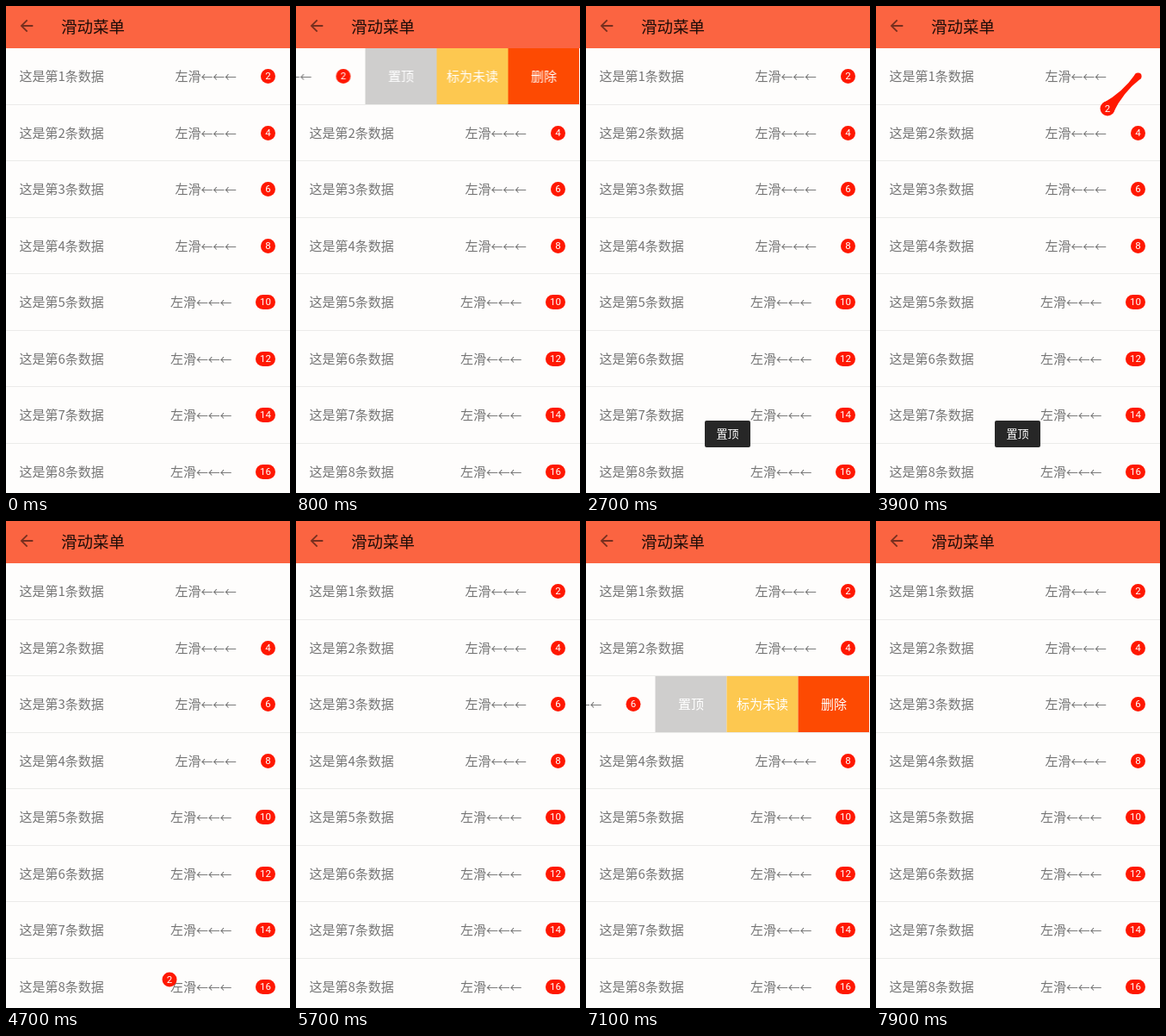
These frames come from a looping animation (330x565 px, 8000 ms). An HTML page:

```html
<!DOCTYPE html>
<html lang="zh-CN">
<head>
<meta charset="utf-8">
<title>滑动菜单</title>
<style>
  :root { --red: #ff1800; --line: #ebebe9; }
  html, body { margin: 0; width: 100%; height: 100%; overflow: hidden; }
  body {
    position: relative;
    background: #fefdfc;
    color: #757575;
    font: 15px/20px "Noto Sans CJK SC", "Noto Sans CJK", "Noto Sans CJK JP", sans-serif;
    white-space: nowrap;
  }
  #stage { position: absolute; left: 0; top: 0; width: 330px; height: 565px; overflow: hidden; }

  header { position: absolute; inset: 0 0 auto; height: 49px; background: #fb6441; }
  header svg { position: absolute; left: 12.5px; top: 12px; fill: #762f1f; }
  header b { position: absolute; left: 64px; top: 11px; font: 400 18.5px/24px inherit; font-size: 18.5px; font-weight: 400; line-height: 24px; color: #1d0c08; }

  .row {
    position: absolute; left: 0; width: 330px; height: 65.5px;
    box-sizing: border-box; border-bottom: 1px solid var(--line); overflow: hidden;
  }
  .slide { position: absolute; inset: 0; }
  .slide > * { position: absolute; top: 0; bottom: 0; display: flex; align-items: center; }
  .name { left: 15.5px; }
  .hint { left: 196.5px; }
  .wide .hint { left: 191px; }
  .hint i { font-style: normal; font-size: 13.8px; }
  .slide > .badge {
    top: 24px; bottom: auto; right: 17px; width: 17px; height: 17px;
    justify-content: center; border-radius: 9px; background: var(--red);
    color: #fff; font: 11.5px/17px Roboto, sans-serif;
  }
  .wide .slide > .badge { width: 23px; }
  .menu { left: 330px; width: 249px; color: #fff; }
  .menu span { flex: 1; height: 100%; display: flex; align-items: center; justify-content: center; }
  .menu span:nth-child(1) { background: #cfcecd; }
  .menu span:nth-child(2) { background: #fdc850; }
  .menu span:nth-child(3) { background: #fd4a02; }

  #goo { position: absolute; inset: 0; fill: var(--red); }
  #goo text { fill: #fff; font: 11.5px Roboto, sans-serif; text-anchor: middle; }

  #toast {
    position: absolute; left: 138px; top: 481px; width: 53px; height: 31px;
    border-radius: 2px; background: #272727; color: #fff;
    font-size: 13px; line-height: 30px; text-align: center;
    animation: toast 8s step-end infinite;
  }
  #row0 .slide { animation: swipeFirst 8s step-end infinite; }
  #row2 .slide { animation: swipeThird 8s step-end infinite; }

  @keyframes swipeFirst {
    0%, 30%, 100% { transform: none; }
    6.25% { transform: translateX(-40px); }
    7.5% { transform: translateX(-145px); }
    8.75% { transform: translateX(-230px); }
    10% { transform: translateX(-249.5px); }
    28.75% { transform: translateX(-31px); }
  }
  @keyframes swipeThird {
    0%, 98.75%, 100% { transform: none; }
    85% { transform: translateX(-40px); }
    86.25% { transform: translateX(-145px); }
    87.5% { transform: translateX(-230px); }
    88.75% { transform: translateX(-249.5px); }
    93.75% { transform: translateX(-225px); }
    95% { transform: translateX(-140px); }
    96.25% { transform: translateX(-55px); }
    97.5% { transform: translateX(-10px); }
  }
  @keyframes toast {
    0%, 58.75%, 100% { opacity: 0; }
    30% { opacity: .3; }
    31.25% { opacity: .6; }
    32.5% { opacity: .85; }
    33.75% { opacity: 1; }
    55% { opacity: .75; }
    56.25% { opacity: .45; }
    57.5% { opacity: .15; }
  }
</style>
</head>
<body>
<div id="stage">
  <header>
    <svg width="22" height="22" viewBox="0 0 24 24"><path d="M20 11H7.83l5.59-5.59L12 4l-8 8 8 8 1.41-1.41L7.83 13H20z"/></svg>
    <b>滑动菜单</b>
  </header>
  <main id="list"></main>
  <svg id="goo" width="330" height="565">
    <path id="stick"/>
    <circle id="root"/>
    <g id="drop"><circle r="8.5"/><text y="4.1">2</text></g>
  </svg>
  <div id="toast">置顶</div>
</div>
<script>
  const $ = id => document.getElementById(id);

  $('list').innerHTML = Array.from({ length: 8 }, (_, i) => `
    <div id="row${i}" class="row${i > 3 ? ' wide' : ''}" style="top:${49 + 65.5 * i}px">
      <div class="slide">
        <span class="name">这是第${i + 1}条数据</span>
        <span class="hint">左滑<i>←←←</i></span>
        <span class="badge">${2 * i + 2}</span>
        ${i === 0 || i === 2 ? '<div class="menu"><span>置顶</span><span>标为未读</span><span>删除</span></div>' : ''}
      </div>
    </div>`).join('');

  const LOOP = 8000, STEP = 100;
  const HOME = [304.5, 81.5], RADIUS = 8.5, REACH = 80;
  const RELEASE = 5400, BACK = 220;

  // Finger path: time, x, y
  const path = [
    [3200, ...HOME], [3500, 293, 93], [3900, 269, 119], [4100, 270, 122],
    [4300, 140, 215], [4500, 72, 400], [4600, 120, 510], [4700, 190, 532],
    [4800, 280, 420], [4900, 304, 270], [5000, 270, 150], [5100, 262, 128],
    [RELEASE, 260, 133]
  ];
  const lerp = (a, b, k) => a + (b - a) * k;

  function dropAt(t) {
    if (t <= path[0][0] || t >= RELEASE + BACK) return null;
    if (t >= RELEASE) {
      const s = (t - RELEASE) / BACK - 1;
      const k = s * s * (5 * s + 4) + 1; // overshoot, tension 4
      const [, x, y] = path[path.length - 1];
      return [lerp(x, HOME[0], k), lerp(y, HOME[1], k)];
    }
    const n = path.findIndex(p => p[0] > t);
    const [t0, x0, y0] = path[n - 1], [t1, x1, y1] = path[n];
    const k = (t - t0) / (t1 - t0);
    return [lerp(x0, x1, k), lerp(y0, y1, k)];
  }

  function drawGoo(t) {
    const drop = dropAt(t);
    $('goo').style.display = drop ? '' : 'none';
    document.querySelector('#row0 .badge').style.visibility = drop ? 'hidden' : '';
    if (!drop) return;

    const [hx, hy] = HOME, [x, y] = drop;
    const dist = Math.hypot(x - hx, y - hy) || 1;
    const r = dist > REACH ? 0 : RADIUS * (1 - .8 * dist / REACH);
    const nx = (hy - y) / dist, ny = (x - hx) / dist;
    const mid = `Q${(x + hx) / 2} ${(y + hy) / 2} `;
    const side = (cx, cy, d) => `${cx + nx * d} ${cy + ny * d}`;

    $('drop').setAttribute('transform', `translate(${x} ${y})`);
    $('root').setAttribute('cx', hx);
    $('root').setAttribute('cy', hy);
    $('root').setAttribute('r', r);
    $('stick').setAttribute('d', r
      ? `M${side(hx, hy, r)}${mid}${side(x, y, RADIUS)}L${side(x, y, -RADIUS)}${mid}${side(hx, hy, -r)}Z`
      : '');
  }

  let start;
  function tick(now) {
    start ??= now;
    const t = (now - start) % LOOP;
    drawGoo(Math.floor(t / STEP) * STEP);
    requestAnimationFrame(tick);
  }
  drawGoo(0);
  requestAnimationFrame(tick);
</script>
</body>
</html>
```
